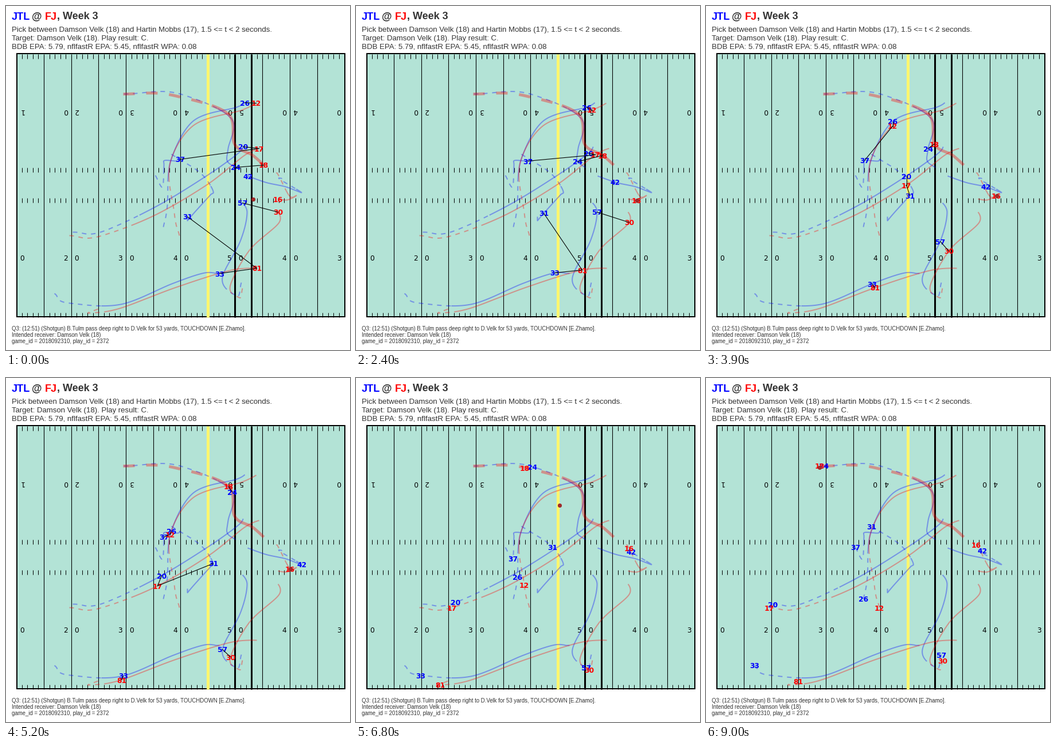
These frames come from a looping animation (600 px wide and 600 px high, 9100 ms). A matplotlib script:

```python
import matplotlib.pyplot as plt
import numpy as np
from matplotlib.animation import FuncAnimation

FRAMES, STEP = 91, 100
SNAP, HANDS, THROW, CATCH = 11, 19, 58, 75
PX = 0.72  # points per pixel at 100 dpi
LEFT, TOP, BOTTOM, YARD = 17.8, 83, 542, 572 / 60
KEYS = np.array([12, 24, 39, 52, 68, 90])
INK = "#333333"

fig = plt.figure(figsize=(6, 6), dpi=100, facecolor="white")
ax = fig.add_axes([0, 0, 1, 1])
ax.set(xlim=(-0.5, 599.5), ylim=(599.5, -0.5))
ax.axis("off")


def write(x, y, s, size, color=INK, font="Liberation Sans", **kw):
    return ax.text(x, y, s, fontsize=size * PX, color=color, family=font, **kw)


def centered(x, y, s, color="black", **kw):
    return write(x, y, s, 12.3, color, "DejaVu Sans", ha="center", va="center", **kw)


# Headings and caption
for x, s, c in [(9, "JTL", "blue"), (45, "@", INK), (67.5, "FJ", "red"),
                (88.5, ", Week 3", INK)]:
    write(x, 23, s, 18, c, weight="bold")
for row, s in enumerate([
    "Pick between Damson Velk (18) and Hartin Mobbs (17), 1.5 <= t < 2 seconds.",
    "Target: Damson Velk (18). Play result: C.",
    "BDB EPA: 5.79, nflfastR EPA: 5.45, nflfastR WPA: 0.08",
]):
    write(9, 44.2 + 15 * row, s, 13.25)
for row, s in enumerate([
    "Q3: (12:51) (Shotgun) B.Tulm pass deep right to D.Velk for 53 yards, "
    "TOUCHDOWN [E.Zhamo].",
    "Intended receiver: Damson Velk (18)",
    "game_id = 2018092310, play_id = 2372",
]):
    write(9, 565.5 + 10.8 * row, s, 9.6)

# Field
ax.add_patch(plt.Rectangle((18.5, 82.5), 60 * YARD, 459, fc="#b3e3d6",
                           ec="black", lw=2 * PX))
for k in range(1, 60):
    x = LEFT + k * YARD
    if k % 5 == 0:
        ax.vlines(x, TOP, BOTTOM, color="black", lw=1.1 * PX)
    else:
        for y in (TOP, 281, 334, BOTTOM - 8):
            ax.vlines(x, y, y + 8, color="black", lw=PX)
for x, c, w in [(351.6, "#fff66e", 5), (398.7, "black", 3), (427.7, "black", 3)]:
    ax.plot([x, x], [TOP, BOTTOM], color=c, lw=w * PX, solid_capstyle="butt", zorder=3)

for k in range(7):
    x = LEFT + k * 10 * YARD
    tens = str(5 - abs(4 - k))
    for side, low, high in [(-9.5, tens, "0"), (9.9, "0", tens)]:
        if 0 <= x + side - LEFT <= 60 * YARD:
            centered(x + side, 440, low, zorder=3)
            centered(x + side, 183.5, high, rotation=180, zorder=3)

# Players: each route passes through one spot per key time, at rest before the snap
path, label = {}, {}


def player(num, color, *spots, drift=(0, 0), width=2, dash=0):
    p = np.array(spots, float)
    v = np.gradient(p, KEYS, axis=0)
    v[0] = 0

    def at(t):
        early = np.clip(1 - t / KEYS[0], 0, 1)[:, None] * np.array(drift)
        t = np.maximum(t, KEYS[0])
        i = np.clip(np.searchsorted(KEYS, t, "right") - 1, 0, len(KEYS) - 2)
        h = np.diff(KEYS)[i][:, None]
        u = (t - KEYS[i])[:, None] / h
        return early + ((1 - u) ** 2 * ((1 + 2 * u) * p[i] + u * h * v[i])
                        + u * u * ((3 - 2 * u) * p[i + 1] + (u - 1) * h * v[i + 1]))

    line = dict(color=color, alpha=0.35, lw=width * PX, zorder=4,
                solid_capstyle="butt", dash_capstyle="butt")
    ax.plot(*at(np.linspace(0, THROW, 240)).T, **line)
    ax.plot(*at(np.linspace(FRAMES - 1, THROW, 160)).T, ls=(dash, (4, 4)), **line)
    path[num] = at(np.arange(FRAMES))
    label[num] = centered(0, 0, str(num), color, weight="bold",
                          zorder=6 if color == "red" else 5)


player(20, "blue", (413, 245), (405, 256), (349, 296), (271, 344), (173, 391), (116, 394))
player(24, "blue", (400, 281), (386, 271), (387, 248), (394, 198), (307, 154), (205, 153))
player(26, "blue", (416, 168), (402, 176), (325, 201), (288, 266), (281, 347), (274, 385))
player(31, "blue", (316, 374), (327, 361), (355, 330), (361, 323), (342, 294), (288, 258),
       drift=(0, -7))
player(33, "blue", (366, 466), (346, 465), (289, 484), (204, 519), (112, 518), (84, 501),
       drift=(6, 0))
player(37, "blue", (303, 267), (299, 270), (276, 269), (275, 277), (273, 314), (260, 295))
player(42, "blue", (421, 296), (452, 307), (488, 315), (515, 325), (479, 303), (481, 300))
player(57, "blue", (412, 343), (420, 359), (408, 410), (377, 473), (401, 505), (410, 482))
player(12, "red", (436, 169), (411, 181), (325, 209), (286, 272), (293, 360), (302, 400))
player(16, "red", (474, 336), (489, 338), (506, 330), (495, 332), (476, 297), (471, 290))
player(17, "red", (441, 248), (417, 259), (349, 312), (264, 362), (167, 400), (110, 400))
player(18, "red", (449, 277), (430, 260), (398, 240), (388, 189), (294, 156), (198, 153),
       width=5, dash=6.8)
player(30, "red", (474, 359), (476, 377), (423, 427), (391, 486), (406, 508), (412, 492))
player(81, "red", (437, 457), (394, 460), (294, 491), (201, 526), (146, 535), (160, 528))

# Defender -> covered receiver, and defender -> (frame of hand-over, next receiver)
cover = {20: 17, 24: 18, 26: 12, 31: 81, 33: 81, 37: 17, 57: 30}
hand_over = {31: (27, 17), 37: (37, 12)}
link = {d: ax.plot([], [], color="black", lw=1.1 * PX, zorder=7)[0] for d in cover}
ball, = ax.plot([], [], "o", ms=6.4 * PX, mfc="#a52a2a", mec="#8b1a1a", mew=0.5, zorder=8)


def covered(d, i):
    when, after = hand_over.get(d, (FRAMES, None))
    return cover[d] if i < when else after


def ball_at(i):
    passer, catcher = path[16], path[18]
    spot = np.array([430, 336])
    if i < HANDS:
        u = max(0, (i - SNAP) / (HANDS - SNAP))
        return spot + (passer[HANDS] - spot) * u
    if i <= THROW:
        return passer[i]
    if i < CATCH:
        u = (i - THROW) / (CATCH - THROW)
        return passer[THROW] + (catcher[CATCH] - passer[THROW]) * u
    return catcher[i] + (-1, 2)


def draw(i):
    for num, text in label.items():
        text.set_position(path[num][i] + (0, 1.5))
    for d, line in link.items():
        line.set_data(*zip(path[d][i], path[covered(d, i)][i]))
        line.set_visible(i <= THROW)
    ball.set_data(*ball_at(i)[:, None])
    return [*label.values(), *link.values(), ball]


anim = FuncAnimation(fig, draw, frames=FRAMES, interval=STEP, repeat=True, repeat_delay=0)
plt.show()
```
